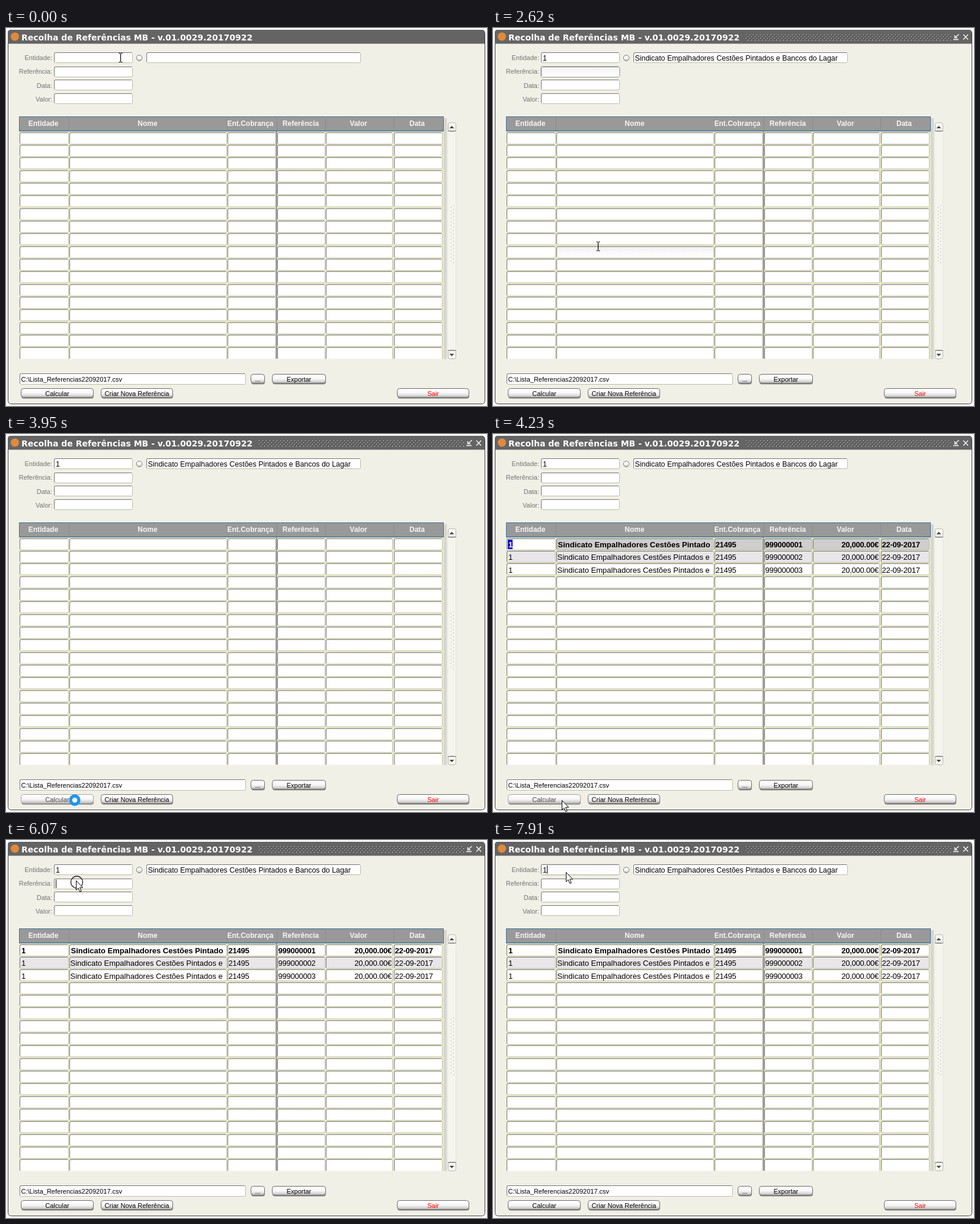
Write an HTML page that moves like this. It is 812 px wide and 637 px high and loops after 8 s.

```html
<!DOCTYPE html>
<html lang="pt">
<head>
<meta charset="utf-8">
<title>Recolha de Referências</title>
<style>
html, body { margin: 0; width: 100%; height: 100%; overflow: hidden; background: #fff; }
svg { display: block; font-family: "Liberation Sans", Arial, sans-serif; }
text { white-space: pre; }
</style>
</head>
<body>
<svg id="stage" width="812" height="637" viewBox="0 0 812 637">
  <defs>
    <linearGradient id="btn" x2="0" y2="1">
      <stop offset="0" stop-color="#fff"/><stop offset=".5" stop-color="#f8f8f8"/>
      <stop offset=".75" stop-color="#dedede"/><stop offset="1" stop-color="#b4b4b4"/>
    </linearGradient>
    <linearGradient id="shade" x2="0" y2="1">
      <stop offset="0" stop-color="#f0f0f2"/><stop offset=".55" stop-color="#fafafb"/>
      <stop offset="1" stop-color="#fff"/>
    </linearGradient>
    <pattern id="grip" x="426" y="10" width="6" height="6" patternUnits="userSpaceOnUse">
      <path d="M1 1h1v1h-1zM4 4h1v1h-1z" fill="#fff"/>
      <path d="M2 2h1v1h-1zM5 5h1v1h-1z" fill="#111"/>
    </pattern>
    <pattern id="thumb" x="749" y="299" width="8" height="6" patternUnits="userSpaceOnUse">
      <path d="M6 0h1v1h-1zM2 3h1v1h-1z" fill="#8c8c88"/>
      <path d="M7 1h1v1h-1zM3 4h1v1h-1z" fill="#fff"/>
    </pattern>
  </defs>
</svg>
<script>
const NS = 'http://www.w3.org/2000/svg';
const stage = document.getElementById('stage');
const LOOP = 8000;

function add(tag, attrs, parent = stage) {
  const el = document.createElementNS(NS, tag);
  for (const k in attrs) el.setAttribute(k, attrs[k]);
  parent.appendChild(el);
  return el;
}
function rect(x, y, width, height, fill, more = {}, parent) {
  return add('rect', { x, y, width, height, fill, ...more }, parent);
}
function label(str, x, y, size, more = {}, parent) {
  const el = add('text', { x, y, 'font-size': size, ...more }, parent);
  el.textContent = str;
  return el;
}
function line(d, stroke, more = {}, parent) {
  return add('path', { d, stroke, fill: 'none', ...more }, parent);
}
const show = (el, on) => el.setAttribute('visibility', on ? 'visible' : 'hidden');
const move = (el, x, y) => el.setAttribute('transform', `translate(${x} ${y})`);

// Sunken box with a dark top-left edge and a lighter bottom-right edge
function field(x, y, w, h, fill = '#fff') {
  const r = x + w, b = y + h;
  const box = rect(x + .5, y + .5, w - 1, h - 1, fill, { rx: 2, stroke: '#bcbda6' });
  line(`M${x + .5} ${b - 2}V${y + 2.5}q0-2 2-2H${r - 2}`, '#757575');
  return box;
}
function button(str, x, y, w, color = '#000') {
  const g = add('g', {});
  rect(x + 1, y + 1.5, w - 1, 16, '#8a8a84', { rx: 4 }, g);
  const box = rect(x + .5, y + .5, w - 1, 15, 'url(#btn)', { rx: 4, stroke: '#6a6a6a' }, g);
  const txt = label(str, x + w / 2, y + 12.5, 11, { 'text-anchor': 'middle', fill: color }, g);
  return on => {
    box.setAttribute('stroke', on ? '#a4a4a0' : '#6a6a6a');
    txt.setAttribute('fill', on ? '#484848' : color);
  };
}

// Window
rect(3.5, 3.5, 805, 630, '#f0f0e6', { rx: 5, stroke: '#3c3c3c' });
line('M3 26.5V8q0-5 5-5H803q5 0 5 5V26.5z', 'none', { fill: '#646464' });
add('circle', { cx: 15, cy: 14.5, r: 7, fill: '#e08a3c' });
label('Recolha de Referências MB - v.01.0029.20170922', 26, 21, 14,
  { fill: '#fff', 'font-weight': 'bold', 'font-family': '"DejaVu Sans", Verdana, sans-serif' });
const active = add('g', {});
rect(426, 10, 347, 11, 'url(#grip)', {}, active);
line('M777 19.5h9M786.5 10.5L779.5 16.5M779.5 12v4.5h4.5M794 11l8 8.5M802 11l-8 8.5', '#fff', { 'stroke-width': 1.3 }, active);

// Form
const ENT = [81, 41, 133, 18], REF = [81, 65, 133, 18], VAL = [81, 110, 133, 18], FILE = [23, 582, 382, 19];
[['Entidade:', 54], ['Referência:', 77], ['Data:', 101], ['Valor:', 124]].forEach(([s, y]) =>
  label(s, 78, y, 11, { 'text-anchor': 'end', fill: '#747474' }));
[ENT, REF, [81, 87, 133, 18], VAL, [237, 41, 362, 18], FILE].forEach(b => field(...b));
add('circle', { cx: 225, cy: 50.5, r: 4.8, fill: 'url(#btn)', stroke: '#777' });
const setCalc = button('Calcular', 25, 607, 123);
const setNew = button('Criar Nova Referência', 160, 607, 122);
button('Sair', 660, 607, 122, '#f00');
button('...', 413, 583, 24);
button('Exportar', 449, 583, 91);

// Table
const cols = [[23, 83, 'Entidade', 63], [107, 266, 'Nome', 239], [374, 82, 'Ent.Cobrança', 412.5],
  [458, 81, 'Referência', 497.5], [540, 113, 'Valor', 595], [655, 82, 'Data', 694]];
const rowY = i => Math.round(175.5 + 21.35 * i);
rect(739, 152, 5, 406, '#d6d6d0');
rect(22, 174, 717, 384, '#e9ecc6');
rect(22.5, 149.5, 716, 24, '#999', { stroke: '#44709c' });
line('M22 173.5H739', '#44709c', { 'stroke-width': 1.6 });
cols.forEach(([x, , name, mid], c) => {
  if (c) line(`M${x - .5} 151V172`, '#8c8c8c');
  label(name, mid, 165, 12, { fill: '#f6f6f6', 'font-weight': 'bold', 'text-anchor': 'middle' });
});
const cells = [];
for (let i = 0; i < 18; i++) {
  const y = rowY(i);
  cells.push(cols.map(([x, w]) => field(x, y, w, i < 17 ? 20 : 21)));
}
rect(22, 557.5, 717, 4, '#f0f0e6');
line('M456.5 174V557', '#8c8c8c', { 'stroke-width': 2 });

// Scrollbar
rect(745.5, 160, 14, 398, '#f5f5ee', { stroke: '#e6e7dc', rx: 4 });
rect(749, 299, 8, 99, 'url(#thumb)');
[[159, 'M748.5 169h8l-4-4z'], [542, 'M748.5 549h8l-4 4z']].forEach(([y, d]) => {
  rect(746.5, y + .5, 13, 15, '#f6f6f2', { rx: 3, stroke: '#b8b8b0' });
  line(y < 200 ? 'M746 173.5H760' : 'M746 543.5H760', '#777');
  line(d, 'none', { fill: '#444' });
});

// Highlights
const hover = rect(0, 0, 10, 10, 'url(#shade)');
const glow = add('g', {});
const halo = rect(0, 0, 10, 10, 'none', { rx: 3, stroke: '#c8c8c0' }, glow);
const tint = rect(0, 0, 10, 10, 'url(#shade)', {}, glow);
function fit(el, [x, y, w, h], pad) {
  const v = { x: x - pad, y: y - pad, width: w + 2 * pad, height: h + 2 * pad };
  for (const k in v) el.setAttribute(k, v[k]);
}

// Texts
const head = 'Sindicato Empalhadores Cestões Pintados e';
label('C:\\Lista_Referencias22092017.csv', 25.5, 596, 11);
const one = label('1', 84, 55, 12.4);
const owner = label(head + ' Bancos do Lagar', 239.5, 55, 12.4);
const caret = rect(0, 0, 1, 14, '#000');
const data = add('g', {});
const mark = rect(25, 178, 8, 16, '#0000d8', {}, data);
let first;
[191, 212, 234].forEach((y, i) => {
  const look = i ? {} : { 'font-weight': 'bold' };
  const num = { ...look, 'letter-spacing': -.23 };
  const t = label('1', 26, y, 13, look, data);
  if (!i) first = t;
  label(i ? head : head.slice(0, -3), i ? 108.5 : 109.5, y, 13, look, data);
  label('21495', 375.5, y, 13, num, data);
  label('99900000' + (i + 1), 459.5, y, 13, num, data);
  label('20,000.00€', 651, y, 13, { ...num, 'text-anchor': 'end' }, data);
  label('22-09-2017', 656.5, y, 13, num, data);
});

// Pointers
const beam = add('g', {});
line('M-3 -7.5h2.5M.5 -7.5h2.5M-3 7.5h2.5M.5 7.5h2.5M0 -7V7', '#000', { 'stroke-width': 1.2 }, beam);
const ring = add('circle', { r: 10, fill: 'none', stroke: '#222', 'stroke-width': 1.3, cx: 119.5, cy: 71 });
const arrow = add('g', {});
line('M.5 .5V16.3L4 13L6.7 19.2L9.2 18.1L6.6 12.1H11.6z', '#000', { fill: '#fff' }, arrow);
const busy = add('g', {});
add('circle', { r: 7, fill: '#fff', stroke: '#2095f0', 'stroke-width': 5.4 }, busy);

const nameCell = i => [107, rowY(i), 266, 20];
// Each step overrides parts of the state before it
const steps = [
  [0, { ptr: beam, x: 193.5, y: 50, focus: null, level: 0, over: null, caret: null }],
  [780, { active: 1, focus: ENT, level: .5, caret: [84, 43] }],
  [1310, { level: 1 }],
  [1560, { one: 1, caret: [91, 43] }],
  [2060, { owner: 1, focus: REF, level: .5, caret: [84, 67], y: 57 }],
  [2620, { level: 1, caret: null, x: 177.5, y: 368, over: nameCell(9) }],
  [2890, { y: 519, over: nameCell(16) }],
  [3160, { x: 170.5, y: 594, over: FILE, caret: [84, 67] }],
  [3430, { ptr: arrow, x: 168, y: 609, over: null, nova: 1 }],
  [3680, { x: 116, y: 617, nova: 0, calc: 1 }],
  [3950, { ptr: busy, focus: null, caret: null }],
  [4230, { ptr: arrow, data: 1, current: 1 }],
  [5010, { ptr: beam, x: 118.5, y: 336, calc: 0, over: nameCell(7) }],
  [5280, { x: 120.5, y: 127, over: VAL }],
  [5550, { x: 121.5, y: 84, over: null, focus: REF, level: .8 }],
  [5800, { y: 70 }],
  [6070, { ptr: arrow, x: 118, y: 68, ring: 1, current: 0, level: 0, caret: [84, 67] }],
  [6350, { ptr: beam, x: 119.5, y: 70, ring: 0 }],
  [6600, { ptr: arrow, x: 119, y: 62, level: 1 }],
  [7400, { caret: null }],
  [7660, { x: 123, y: 54, focus: ENT, level: 1, caret: [84, 67] }],
  [7910, { level: .4, caret: [91, 43] }]
];

function render(t) {
  const s = {};
  for (const [at, part] of steps) if (t >= at) Object.assign(s, part);
  show(active, s.active);
  show(one, s.one);
  show(owner, s.owner);
  show(data, s.data);
  show(mark, s.data && s.current);
  first.setAttribute('fill', s.current ? '#fff' : '#000');
  cells[0].forEach((c, i) => c.setAttribute('fill', s.current && i ? '#cecece' : '#fff'));
  cells[1].forEach(c => c.setAttribute('fill', s.data ? '#e8e6e8' : '#fff'));
  setCalc(s.calc);
  setNew(s.nova);
  show(hover, s.over);
  if (s.over) fit(hover, s.over, -1);
  show(glow, s.focus);
  glow.setAttribute('opacity', s.level);
  if (s.focus) { fit(halo, s.focus, .5); fit(tint, s.focus, -1); }
  show(caret, s.caret);
  if (s.caret) move(caret, ...s.caret);
  show(ring, s.ring);
  for (const p of [beam, arrow, busy]) show(p, p === s.ptr);
  move(s.ptr, s.x, s.y);
}
const start = performance.now();
function tick() {
  render((performance.now() - start) % LOOP);
  requestAnimationFrame(tick);
}
tick();
</script>
</body>
</html>
```
